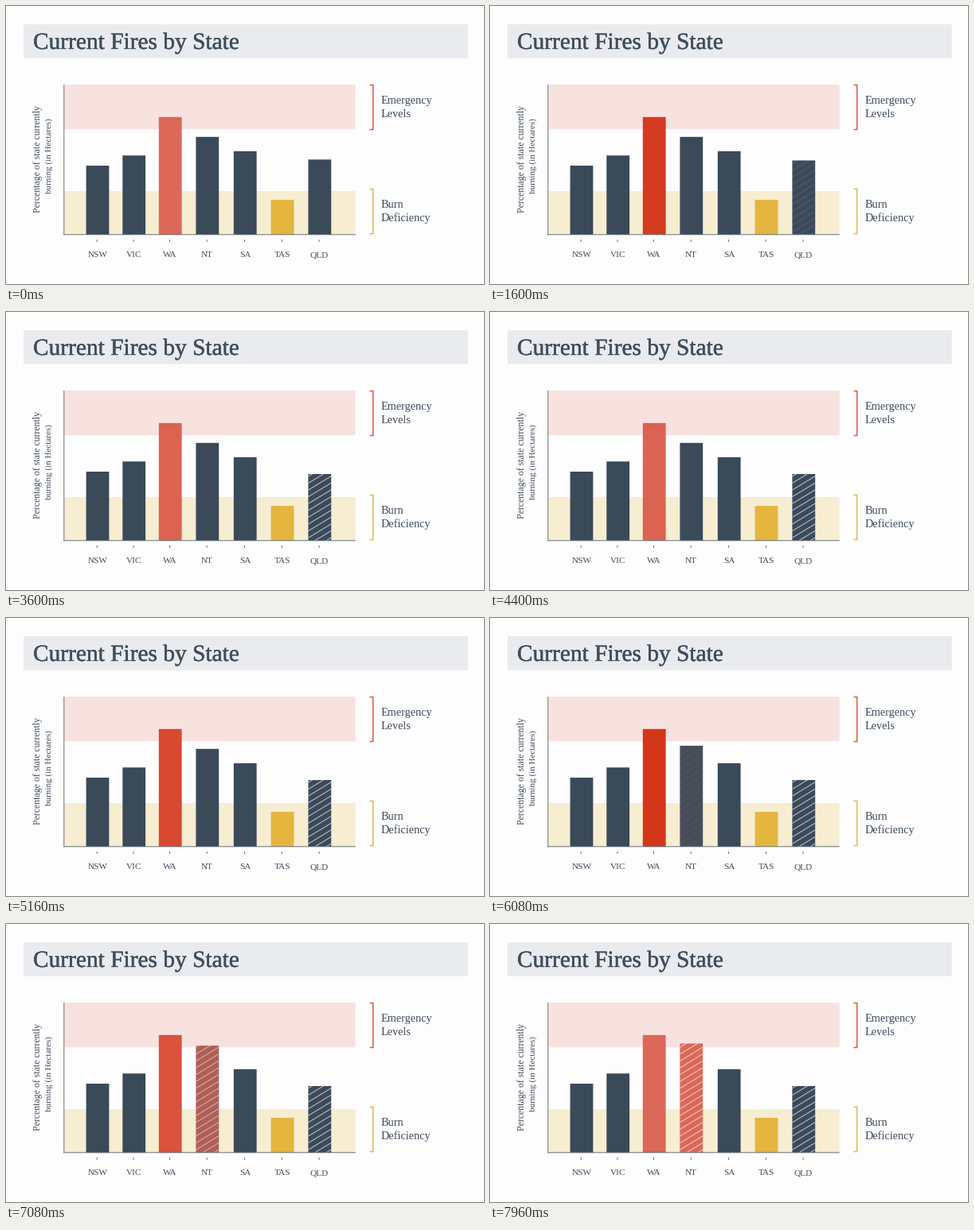
Recreate the animation shown at these times as a matplotlib script. Size 600x350 px, loop 8 s.

```python
import math

import matplotlib.pyplot as plt
import numpy as np
from matplotlib.animation import FuncAnimation
from matplotlib.collections import LineCollection
from matplotlib.patches import Rectangle
from matplotlib.patheffects import withStroke

W, H, DPI = 600, 350, 100
STEP, LOOP = 40, 8000
PX = 72 / DPI  # points per pixel

INK = "#3f4d5c"
DARK = np.array([59, 74, 89]) / 255
CORAL = np.array([219, 104, 88]) / 255
SCARLET = np.array([212, 54, 26]) / 255
YELLOW = "#e4b53f"
AXIS = "#66727f"
FLOOR, BAR_W = 288, 28.8

fig = plt.figure(figsize=(W / DPI, H / DPI), dpi=DPI, facecolor="#fefdfe")
ax = fig.add_axes([0, 0, 1, 1])
ax.set(xlim=(0, W), ylim=(H, 0))
ax.axis("off")


def box(x0, y0, x1, y1, color, z=1):
    return ax.add_patch(Rectangle((x0, y0), x1 - x0, y1 - y0, fc=color, lw=0,
                                  zorder=z, snap=False))


def line(xs, ys, color, width=1.0, z=4):
    ax.plot(xs, ys, color=color, lw=width * PX, zorder=z, snap=False,
            solid_capstyle="butt", solid_joinstyle="miter")


def label(x, y, text, size, weight=0.0, ha="left", angle=0):
    effects = [withStroke(linewidth=weight * PX, foreground=INK)] if weight else None
    ax.text(x, y, text, fontsize=size * PX, family="Liberation Serif", color=INK,
            ha=ha, va="baseline", rotation=angle, rotation_mode="anchor", zorder=5,
            path_effects=effects)


def hatch(x, color):
    rise = 17.5
    starts = np.arange(FLOOR + rise - 4, 130, -8.6)
    segs = [[(x, y), (x + BAR_W, y - rise)] for y in starts]
    return ax.add_collection(
        LineCollection(segs, colors=[color], linewidths=1.1 * PX, zorder=3),
        autolim=False)


def progress(t, start, length):
    return min(max((t - start) / length, 0), 1)


def ease_out(u):
    return 1 - (1 - u) ** 2


def smooth(u):
    return u * u * (3 - 2 * u)


def mix(a, b, u):
    return a + (b - a) * u


# Header and threshold bands
box(22, 23, 579.7, 65.7, "#e9ebee")
label(34, 54, "Current Fires by State", 29.4, 0.4)
box(73, 99, 438.7, 155.3, "#f8e2e0")
box(73, 233, 438.7, 288, "#f7edd1")

# Axes
line([72.8, 72.8], [99, 288.3], AXIS)
line([72.3, 438.7], [287.8, 287.8], AXIS)
label(43.5, 193, "Percentage of state currently", 11.7, 0, "center", 90)
label(57, 189, "burning (in Hectares)", 11.1, 0, "center", 90)

# Brackets
for top, color, words in ((99.5, "#dc5546", ("Emergency", "Levels")),
                          (230.5, "#e3b64a", ("Burn", "Deficiency"))):
    line([456.5, 460.7, 460.7, 456.5], [top, top, top + 56, top + 56], color, 1.5)
    for i, word in enumerate(words):
        label(470.5, top + 24 + 16.5 * i, word, 14.2)

# Bars
states = [("NSW", 100.6, 201), ("VIC", 146.3, 188.2), ("WA", 191.8, 139.8),
          ("NT", 238.4, 164.8), ("SA", 285.8, 182.8), ("TAS", 332.6, 244.1),
          ("QLD", 379.4, 193.3)]
bars, hatches = {}, {}
for name, x, top in states:
    bars[name] = box(x, top, x + BAR_W, FLOOR, YELLOW if name == "TAS" else DARK, 2)
    mid = x + BAR_W / 2
    line([mid - 0.7, mid - 0.7], [294, 297], AXIS)
    label(mid - 0.2, 316, name, 11.2, 0, "center")
    if name in ("NT", "QLD"):
        hatches[name] = hatch(x, "#f0c1b9" if name == "NT" else "#b4bcc4")


def set_top(name, top):
    bars[name].set_y(top)
    bars[name].set_height(FLOOR - top)
    hatches[name].set_clip_path(bars[name])


def update(i):
    t = i * STEP
    pulse = (1 - math.cos(2 * math.pi * t / 4000)) / 2
    bars["WA"].set_facecolor(mix(CORAL, SCARLET, pulse))

    set_top("QLD", mix(193.3, 204, ease_out(progress(t, 1500, 1800))))
    hatches["QLD"].set_alpha(progress(t, 1400, 1300))

    set_top("NT", mix(164.8, 150.4, ease_out(progress(t, 5720, 2400))))
    shift = smooth(progress(t, 5730, 2080))
    bars["NT"].set_facecolor(mix(DARK, CORAL, shift))
    hatches["NT"].set_alpha(shift)
    return [*bars.values(), *hatches.values()]


anim = FuncAnimation(fig, update, frames=LOOP // STEP, interval=STEP,
                     repeat=True, repeat_delay=0, blit=False)
plt.show()
```
